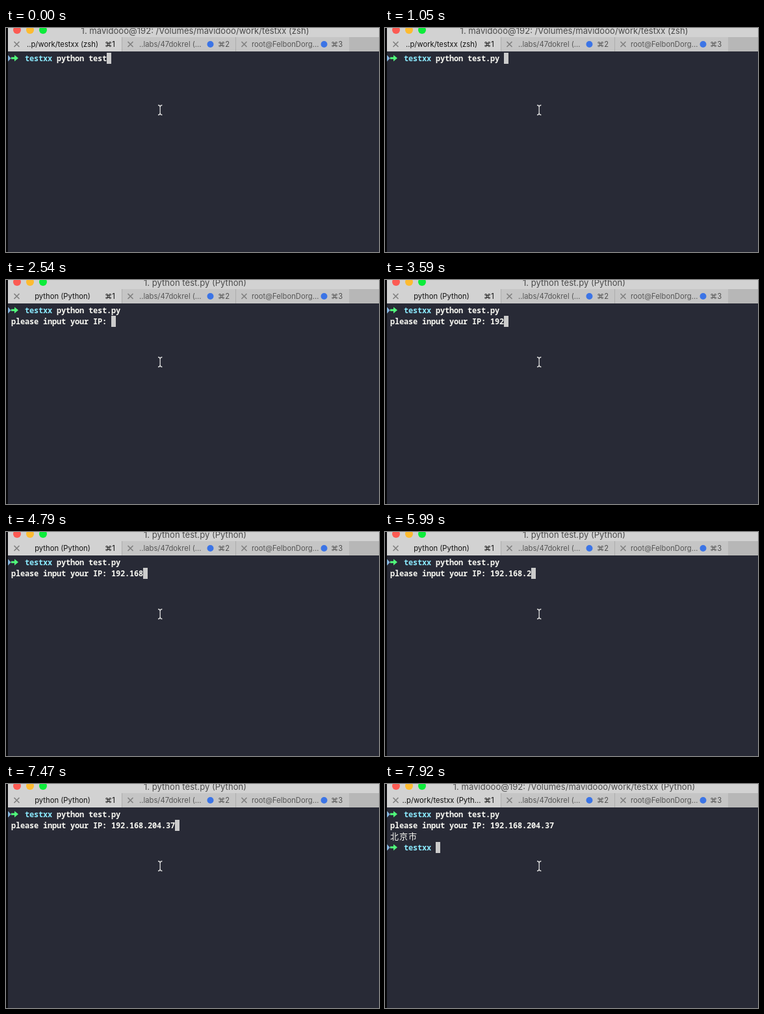
Animation of 574 by 344 pixels, one loop 8000 ms. Source, as an HTML page:

```html
<!DOCTYPE html>
<html lang="en">
<head>
<meta charset="utf-8">
<title>Terminal session</title>
<style>
  html, body { margin: 0; width: 100%; height: 100%; overflow: hidden; background: #282a36; }
  svg { display: block; width: 574px; height: 344px; }
  text { white-space: pre; }
  .ui { font-family: Inter, Roboto, sans-serif; font-size: 11.25px; fill: #565656; }
  .title { font-size: 13.1px; fill: #4b4b4b; text-anchor: middle; }
  .on { fill: #111; }
  .mid { text-anchor: middle; }
  .key { font-family: Inter, "DejaVu Sans", sans-serif; font-size: 11.25px; fill: #505050; }
  .key.on { fill: #111; }
  .term { font: 600 12px "Noto Sans Mono", "DejaVu Sans Mono", monospace; letter-spacing: -.2px; fill: #f8f8f2; }
  .dir { font-weight: 700; fill: #8be9fd; }
  .cjk { font: 500 13px "Noto Sans CJK SC", "Noto Sans CJK", "Noto Sans CJK JP", sans-serif; letter-spacing: 1px; fill: #f8f8f2; }
  .cross { stroke: #818181; stroke-width: 1.7; fill: none; }
  .dot { fill: #3b74e6; }
</style>
</head>
<body>
<svg viewBox="0 0 574 344" xmlns="http://www.w3.org/2000/svg">
  <defs>
    <path id="x" class="cross" d="M-4-4 4 4M4-4-4 4"/>
    <g id="prompt">
      <path d="M3 3.5 7.7 8.5 3 13.5Z" fill="#86b5dc"/>
      <path d="M8 6.8H13V3.4L19 8.3 13 13.2V9.8H8Z" fill="#50fa7b"/>
      <text class="term dir" x="29" y="13">testxx</text>
    </g>
  </defs>

  <rect width="574" height="344" fill="#282a36"/>

  <!-- window chrome -->
  <rect width="574" height="36" fill="#d2d2d2"/>
  <rect x="179" y="14" width="349" height="22" fill="#c5c5c5"/>
  <rect x="528" y="14" width="46" height="22" fill="#b7b7b7"/>
  <path d="M178.5 14V36M353.5 14V36" stroke="#adadad"/>
  <rect width="3" height="344" fill="#08080a"/>
  <circle cx="17" cy="3" r="6" fill="#fc5b53"/>
  <circle cx="37" cy="3" r="6" fill="#fdbb30"/>
  <circle cx="57" cy="3" r="6" fill="#0cec3a"/>
  <text class="ui title" id="title" x="291" y="8.6"></text>

  <!-- tabs -->
  <use href="#x" x="16.5" y="25"/>
  <use href="#x" x="191.5" y="25"/>
  <use href="#x" x="366.5" y="25"/>
  <text class="ui on mid" id="tab" x="87" y="29"></text>
  <text class="ui" x="205" y="29">..labs/47dokrel (…</text>
  <text class="ui" x="378" y="29">root@FelbonDorg…</text>
  <circle class="dot" cx="314.5" cy="25" r="5"/>
  <circle class="dot" cx="489.5" cy="25" r="5"/>
  <text class="key on" x="152" y="29">⌘1</text>
  <text class="key" x="326" y="29">⌘2</text>
  <text class="key" x="500" y="29">⌘3</text>

  <!-- terminal -->
  <use href="#prompt" y="38"/>
  <text class="term" id="cmd" x="78" y="51"></text>
  <text class="term" id="ask" x="8" y="68"></text>
  <g id="done">
    <text class="cjk" x="8" y="85">北京市</text>
    <use href="#prompt" y="89"/>
  </g>
  <rect id="cursor" width="7" height="17" fill="#cbcbcb"/>

  <!-- mouse pointer -->
  <path d="M234 118.5Q237.2 118.5 237.2 121.5V130.5Q237.2 133.5 234 133.5M240.4 118.5Q237.2 118.5 237.2 121.5M240.4 133.5Q237.2 133.5 237.2 130.5"
        fill="none" stroke="#dedede" stroke-width="1.3"/>
</svg>
<script>
  const LOOP = 8000, CELL = 7, LINE = 17, LEFT = 8, TOP = 38;
  const RUN = 2240, ASK = 2540, END = 7920;
  const QUESTION = 'please input your IP: ';
  const ADDRESS = '192.168.204.37';
  const KEYS = [3140, 3440, 3590, 3890, 4190, 4490, 4790,
                5390, 5990, 6130, 6430, 6730, 7180, 7470];
  const PLACE = '1. mavidooo@192: /Volumes/mavidooo/work/testxx ';

  const COMMANDS = [[0, 'python test'], [150, 'python test.'], [1050, 'python test.py ']];
  const TABS = [[0, '..p/work/testxx (zsh)'], [2090, 'python (zsh)'],
                [ASK, 'python (Python)'], [END, '..p/work/testxx (Pyth…']];
  const TITLES = [[0, PLACE + '(zsh)'], [RUN, '1. python test.py (zsh)'],
                  [ASK, '1. python test.py (Python)'], [END, PLACE + '(Python)']];

  const el = id => document.getElementById(id);
  const [title, tab, cmd, ask, done, cursor] =
    ['title', 'tab', 'cmd', 'ask', 'done', 'cursor'].map(el);

  // latest step whose start time has passed
  const at = (steps, t) => steps.filter(([start]) => start <= t).pop()[1];

  function setText(node, value) {
    if (node.textContent !== value) node.textContent = value;
  }

  function setCursor(col, row) {
    cursor.setAttribute('x', LEFT + col * CELL);
    cursor.setAttribute('y', TOP + row * LINE);
  }

  function draw(t) {
    const command = at(COMMANDS, t);
    const typed = KEYS.filter(k => k <= t).length;
    const answer = t < ASK ? '' : QUESTION + ADDRESS.slice(0, typed);

    setText(title, at(TITLES, t));
    setText(tab, at(TABS, t));
    setText(cmd, command);
    setText(ask, answer);
    done.setAttribute('visibility', t < END ? 'hidden' : 'visible');

    if (t < RUN) setCursor(10 + command.length, 0);
    else if (t < END) setCursor(answer.length, 1);
    else setCursor(10, 3);
  }

  function tick() {
    draw(performance.now() % LOOP);
    requestAnimationFrame(tick);
  }
  tick();
</script>
</body>
</html>
```
